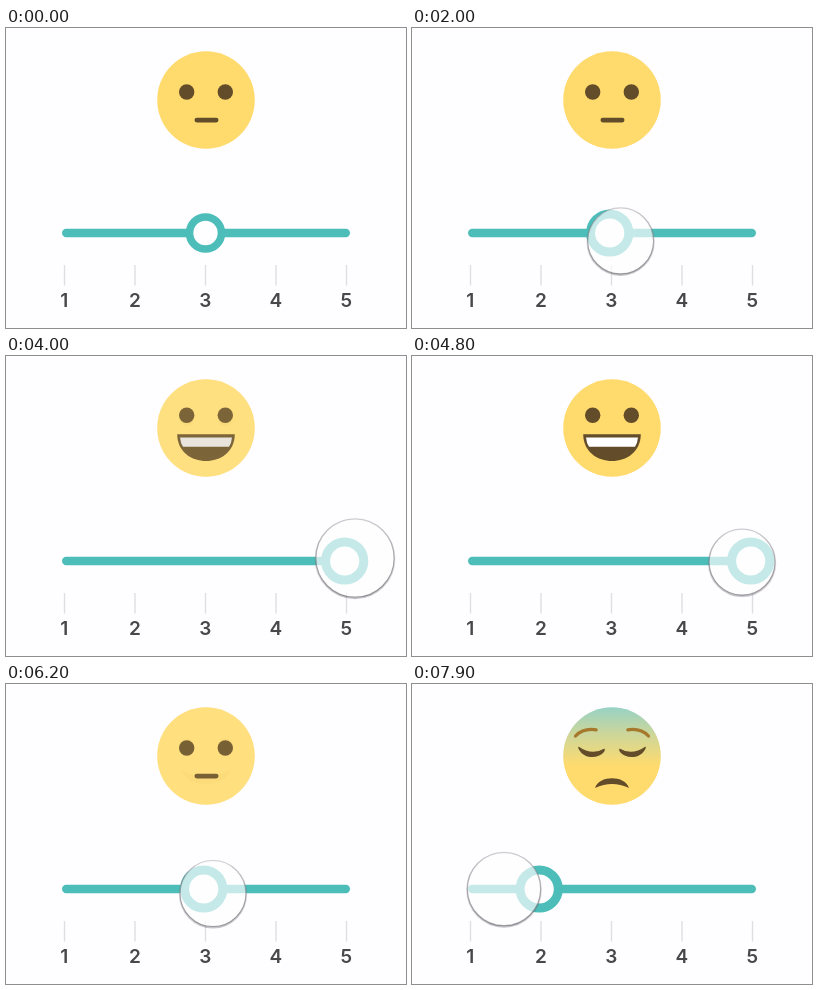
An HTML page with a canvas for the animation above (8000 ms loop, 400 by 300 pixels).

```html
<!DOCTYPE html>
<html lang="en">
<head>
<meta charset="utf-8">
<title>Mood slider</title>
<style>
  html, body { margin: 0; width: 100%; height: 100%; overflow: hidden; background: #fefdff; }
  canvas { display: block; width: 400px; height: 300px; }
</style>
</head>
<body>
<canvas id="stage"></canvas>
<script>
const W = 400, H = 300, LOOP = 8000;
const TEAL = '#4cbdb9', DARK = '#624c2a', YELLOW = '#ffdb6d', BROW = '#a5782b', BG = '#fefdff';
const TRACK_Y = 205, MID_X = 199.5, STEP = 70.5;
const APPEAR = 220, PRESS = 1200, MOVE = 550, FADE = 380, SNAP = 300;

const canvas = document.getElementById('stage');
const ctx = canvas.getContext('2d');
const dpr = window.devicePixelRatio || 1;
canvas.width = W * dpr;
canvas.height = H * dpr;

// Pointer moves; each takes MOVE ms and then rests
const entry = { x: 353, y: 260, r: 33.3 };
const moves = [
  { at: 500, x: 207, y: 198 },
  { at: 1220, x: 207, y: 213 },
  { at: 1950, x: 274, y: 208 },
  { at: 3420, x: 349, y: 202, r: 39.5 },
  { at: 4050, x: 338, y: 206 },
  { at: 4650, x: 295, y: 206.5 },
  { at: 5510, x: 207, y: 209.5 },
  { at: 6650, x: 136, y: 211 },
  { at: 7350, x: 92, y: 205, r: 37 }
];

const clamp = v => Math.max(0, Math.min(1, v));
const mix = (a, b, p) => a + (b - a) * p;
const easeInOut = p => p * p * (3 - 2 * p);
const easeOut = p => 1 - (1 - p) ** 3;
const ramp = (t, start, length) => clamp((t - start) / length);

function pointerAt(t) {
  let pos = entry;
  for (const { at, x, y, r = entry.r } of moves) {
    const p = easeInOut(ramp(t, at, MOVE));
    pos = { x: mix(pos.x, x, p), y: mix(pos.y, y, p), r: mix(pos.r, r, p) };
  }
  return pos;
}

// The handle snaps to the nearest value once the pointer is clearly past halfway
function findSnaps() {
  const list = [{ at: -LOOP, from: 3, to: 3 }];
  for (let t = PRESS; t < LOOP; t += 5) {
    const from = list[list.length - 1].to;
    const pos = 3 + (pointerAt(t).x - MID_X) / STEP;
    if (Math.abs(pos - from) > 0.55) list.push({ at: t, from, to: Math.round(pos) });
  }
  return list;
}
const snaps = findSnaps();

function disc(x, y, r, fill) {
  ctx.beginPath();
  ctx.arc(x, y, r, 0, Math.PI * 2);
  ctx.fillStyle = fill;
  ctx.fill();
}

function ring(x, y, r, width, color) {
  ctx.beginPath();
  ctx.arc(x, y, r, 0, Math.PI * 2);
  ctx.lineWidth = width;
  ctx.strokeStyle = color;
  ctx.stroke();
}

function shape(d, fill) {
  ctx.fillStyle = fill;
  ctx.fill(new Path2D(d));
}

function line(d, width, color) {
  ctx.lineCap = 'round';
  ctx.lineWidth = width;
  ctx.strokeStyle = color;
  ctx.stroke(new Path2D(d));
}

function head(fill = YELLOW) {
  disc(200, 72, 48.8, fill);
}

function eyes(y) {
  disc(180.7, y, 7.7, DARK);
  disc(219.3, y, 7.7, DARK);
}

const faces = {
  2() {
    const g = ctx.createLinearGradient(0, 23, 0, 82);
    g.addColorStop(0, '#96d2c5');
    g.addColorStop(0.45, '#ccd69b');
    g.addColorStop(1, YELLOW);
    head(g);
    for (const side of [1, -1]) {
      ctx.save();
      ctx.translate(200, 0);
      ctx.scale(side, 1);
      line('M-36.5 52 Q-29 44 -15.8 45.8', 3.2, BROW);
      shape('M-33.5 62.5 Q-20 72 -7.5 64.5 Q-6.5 66 -8 68 C-14 75 -27 75 -32.5 66.5 Q-34.5 64 -33.5 62.5Z', DARK);
      ctx.restore();
    }
    shape('M183 104 C187 91 213 91 217 104 Q200 96 183 104Z', DARK);
  },
  3() {
    head();
    eyes(64);
    line('M190.8 92.1 H210.2', 4.6, DARK);
  },
  4() {
    head();
    eyes(62);
    shape('M175.5 86 Q200 98.5 224.5 86 C218 105 182 105 175.5 86Z', DARK);
  },
  5() {
    head();
    eyes(59.3);
    shape('M171.2 78.3 H228.8 C228.5 114 171.5 114 171.2 78.3Z', DARK);
    shape('M174 81.5 H226 Q225.5 87 223 90.8 H177 Q174.5 87 174 81.5Z', '#fff');
  }
};

function drawFace(value, alpha) {
  if (alpha <= 0) return;
  ctx.globalAlpha = alpha;
  faces[value]();
  ctx.globalAlpha = 1;
}

function drawScale() {
  ctx.font = '600 19px Inter, Roboto, sans-serif';
  ctx.textAlign = 'center';
  for (let v = 1; v <= 5; v++) {
    const x = MID_X + (v - 3) * STEP;
    ctx.fillStyle = '#dfdee4';
    ctx.fillRect(x - 0.7, 237, 1.4, 20.5);
    ctx.fillStyle = '#48484c';
    ctx.fillText(v, x - 0.2, 279);
  }
}

function drawSlider(value, press) {
  line(`M60.2 ${TRACK_Y} H339.8`, 8.4, TEAL);
  const x = mix(MID_X, MID_X - 1.8, press) + (value - 3) * STEP;
  const r = mix(16, 19.1, press);
  disc(x, TRACK_Y, r, BG);
  ring(x, TRACK_Y, r, mix(7.6, 9, press), TEAL);
}

function drawPointer({ x, y, r }, shown, press) {
  if (shown <= 0) return;
  const edge = (top, bottom) => {
    const g = ctx.createLinearGradient(0, y - r, 0, y + r);
    g.addColorStop(0, `rgba(105,100,110,${top})`);
    g.addColorStop(1, `rgba(95,92,100,${bottom})`);
    return g;
  };
  ctx.globalAlpha = shown;
  disc(x, y, r, `rgba(255,255,255,${mix(0.5, 0.67, press)})`);
  ring(x, y + 0.8, r, 1.8, edge(0, 0.35));
  ring(x, y, r - 0.3, 1.2, edge(0.32, 0.6));
  ctx.globalAlpha = 1;
}

function draw(t) {
  const { at, from, to } = snaps.findLast(s => s.at <= t);
  const press = easeInOut(ramp(t, PRESS, 250));
  const fade = ramp(t, at, FADE);

  ctx.setTransform(dpr, 0, 0, dpr, 0, 0);
  ctx.fillStyle = BG;
  ctx.fillRect(0, 0, W, H);

  drawFace(from, 1 - fade);
  drawFace(to, fade);
  drawScale();
  drawSlider(mix(from, to, easeOut(ramp(t, at, SNAP))), press);
  drawPointer(pointerAt(t), ramp(t, APPEAR, 250), press);
}

const t0 = performance.now();
function tick() {
  draw((performance.now() - t0) % LOOP);
  requestAnimationFrame(tick);
}
tick();
</script>
</body>
</html>
```
